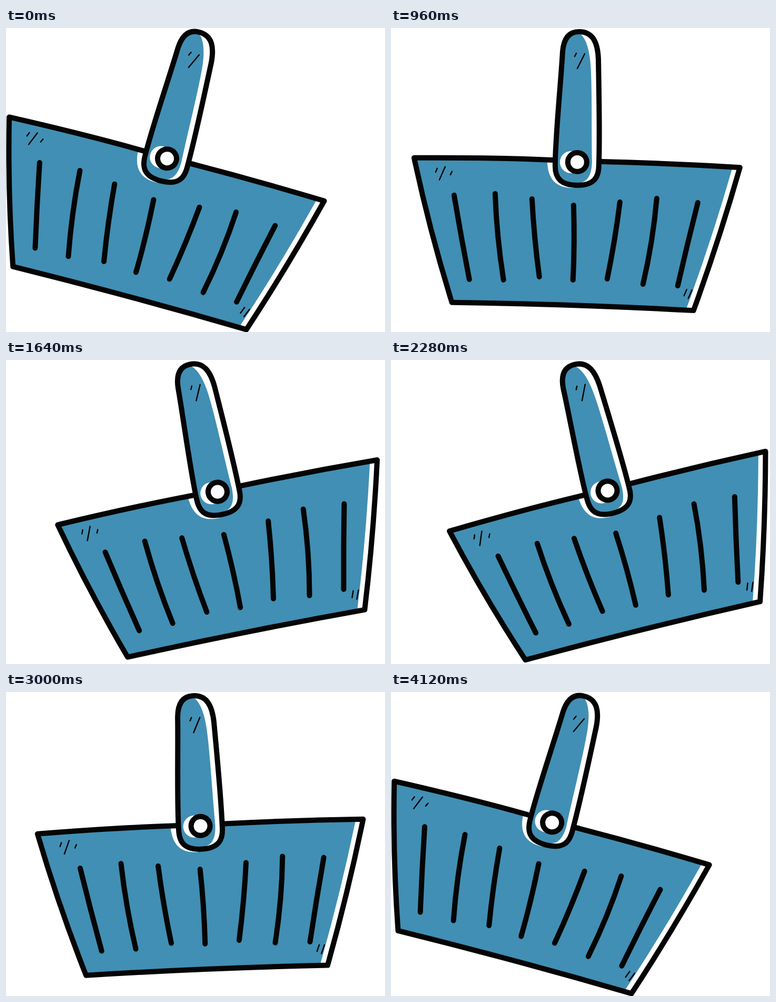
Recreate the animation shown at these times as an HTML page. Size 720 px wide and 578 px high, loop 4160 ms.

```html
<!DOCTYPE html>
<html lang="en">
<head>
<meta charset="utf-8">
<title>Swinging basket</title>
<style>
  html, body { margin: 0; width: 100%; height: 100%; overflow: hidden; background: #fff; }
  svg { display: block; width: 100vw; height: 100vh; }
  .blue { fill: #418fb4; }
  .white { fill: #fff; }
  .line { fill: none; stroke: #050505; stroke-width: 10; stroke-linecap: round; stroke-linejoin: round; }
  .thin { stroke-width: 2.5; }
</style>
</head>
<body>
<svg viewBox="0 0 720 578">
  <g id="basket">
    <path class="blue" d="M44 247Q190 246 306 251L399 254Q530 257 648 268Q609 404 562 532Q350 524 115 522Q72 387 44 247Z"/>
    <path class="white" d="M297 254C298 286 312 304 345 304L360 300V254Z"/>
    <path class="line" d="M44 247Q190 246 306 251L399 254Q530 257 663 265Q623 405 575 537Q350 525 116 522Q74 387 44 247Z"/>
    <g id="slats" class="line"></g>

    <path class="white" d="M357 7C337 7 328 22 326 45C323 100 312 210 312 262C312 285 322 299 355 299C385 299 395 285 395 260C397 200 395 120 394 60C393 30 385 7 357 7Z"/>
    <path class="blue" d="M357 9C337 9 328 22 325 45C321 100 311 210 311 262C311 284 322 295 352 295C374 295 381 280 382 255C381 200 382 130 380 85C379 45 371 18 357 9Z"/>
    <path class="line" d="M357 7C337 7 328 22 326 45C323 100 312 210 312 262C312 285 322 299 355 299C385 299 395 285 395 260C397 200 395 120 394 60C393 30 385 7 357 7Z"/>
    <circle class="white" cx="342" cy="255" r="21"/>
    <circle class="line" cx="354" cy="255" r="18" style="fill:#fdfdfd"/>

    <path class="line thin" d="M352 48l-3 6M368 49l-14 28M88 267l-3 7M103 264l-11 25M116 273l-3 6M562 497l-5 12M572 498l-7 16"/>
  </g>
</svg>
<script>
  // Each slat: x1, y1, x2, y2, sideways bow
  const slats = [
    [120, 318, 149, 478, -1], [198, 315, 214, 479, -5], [268, 325, 282, 473, -3],
    [347, 337, 346, 479, 3], [435, 331, 411, 477, 3], [505, 324, 479, 487, 6],
    [583, 332, 545, 490, -1]
  ];
  document.getElementById('slats').innerHTML = slats.map(([x1, y1, x2, y2, bow]) =>
    `<path d="M${x1} ${y1}Q${(x1 + x2) / 2 + bow} ${(y1 + y2) / 2} ${x2} ${y2}"/>`).join('');

  const LOOP = 4160, STEP = 40;
  const START = 13.24, SWING = 29.85;
  const basket = document.getElementById('basket');
  const ease = p => p * p * (3 - 2 * p);

  function draw() {
    const t = Math.floor(performance.now() % LOOP / STEP) * STEP;
    const p = 1 - Math.abs(1 - t / (LOOP / 2));
    basket.setAttribute('transform', `rotate(${START - SWING * ease(p)} 359 45)`);
    requestAnimationFrame(draw);
  }
  draw();
</script>
</body>
</html>
```
